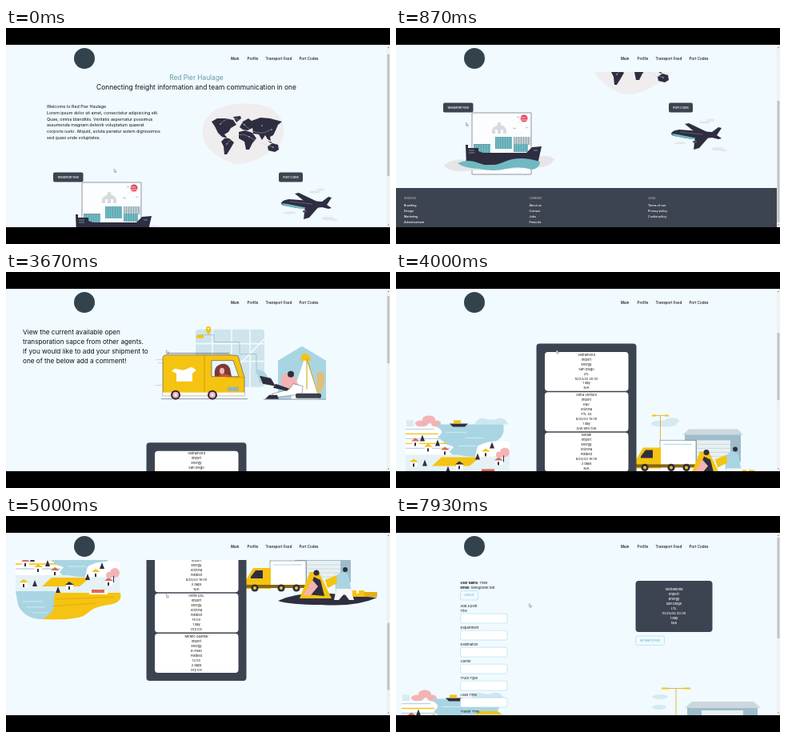
Write an HTML page that moves like this. It is 480 px wide and 270 px high and loops after 8 s.

```html
<!DOCTYPE html>
<html lang="en">
<head>
<meta charset="utf-8">
<style>
  html, body { margin: 0; width: 100%; height: 100%; overflow: hidden; background: #000; }
  svg { display: block; width: 100vw; height: 100vh; font-family: Inter, "Open Sans", sans-serif; }
</style>
</head>
<body>
<svg id="stage" viewBox="0 0 480 270"></svg>
<script>
const LOOP = 8000;
const PAPER = '#f0faff', SLATE = '#3d4451', INK = '#2f2e41', TEAL = '#71b9c2',
      SKY = '#a9d5e3', YELLOW = '#f5c311', PINK = '#f3b3b4', PALE = '#e6e5e8';

// Shape helpers; text is placed by its vertical middle.
const rect = (x, y, w, h, fill, rx = 0, more = '') =>
  `<rect x="${x}" y="${y}" width="${w}" height="${h}" rx="${rx}" fill="${fill}" ${more}/>`;
const path = (d, fill, more = '') => `<path d="${d}" fill="${fill}" ${more}/>`;
const line = (d, stroke, width = 0.6) => path(d, 'none', `stroke="${stroke}" stroke-width="${width}"`);
const oval = (x, y, rx, ry, fill) => `<ellipse cx="${x}" cy="${y}" rx="${rx}" ry="${ry}" fill="${fill}"/>`;
const dot = (x, y, r, fill) => oval(x, y, r, r, fill);
const text = (x, y, s, size, fill = '#111', more = '') =>
  `<text x="${x}" y="${y + size * 0.36}" font-size="${size}" fill="${fill}" ${more}>${s.replace(/&/g, '&amp;')}</text>`;
const lines = (x, y, gap, list, size, fill, more) =>
  list.map((s, i) => text(x, y + i * gap, s, size, fill, more)).join('');
const group = (shapes, dx = 0, dy = 0) => `<g transform="translate(${dx} ${dy})">${shapes}</g>`;
const times = (n, f) => Array.from({ length: n }, (_, i) => f(i)).join('');
const MID = 'text-anchor="middle"', BOLD = 'font-weight="600"', MEDIUM = 'font-weight="500"';

const button = (x, y, w, label, id) =>
  rect(x, y, w, 12, SLATE, 2, `id="${id}"`) + text(x + w / 2, y + 6, label, 3, '#fff', MID + ' ' + BOLD);
const ghost = (x, y, w, label) =>
  rect(x, y, w, 11.5, PAPER, 2, 'stroke="#8ed3e8" stroke-width=".5"') +
  text(x + w / 2, y + 5.8, label, 2.9, '#4fb0cd', MID + ' ' + MEDIUM);

function footer(y) {
  const cols = [
    [10, 'SERVICES', 'Branding', 'Design', 'Marketing', 'Advertisement'],
    [166.5, 'COMPANY', 'About us', 'Contact', 'Jobs', 'Press kit'],
    [315, 'LEGAL', 'Terms of use', 'Privacy policy', 'Cookie policy']];
  return rect(0, y, 476, 60, SLATE) + cols.map(([x, title, ...links]) =>
    text(x, y + 12.5, title, 3.1, '#a3a8b0', BOLD) +
    lines(x, y + 21.5, 7, links, 3.6, '#fff', MEDIUM)).join('');
}

function worldMap() {
  const land = [
    'M257 117L264 113 275 113 284 115 288 121 281 125 278 130 273 133 277 138 270 136 265 131 261 123Z',
    'M284 111L293 110 294 113 288 118Z',
    'M273 138L279 138 285 143 281 150 276 158 273 158 272 148 269 142Z',
    'M292 124L296 117 303 113 308 117 308 125 302 128 296 127Z',
    'M291 130L299 128 308 131 313 138 308 144 304 152 300 152 298 142 291 138Z',
    'M307 116L318 112 330 113 345 117 340 121 337 128 334 134 330 136 331 141 327 139 324 134 320 140 316 133 309 132Z',
    'M327 148L333 144 340 146 341 152 336 155 328 153Z',
    'M327 141L333 143 331 144Z'];
  const pins = [[268, 120], [276, 145], [298, 121], [304, 136], [320, 122], [332, 127], [334, 149]];
  return path('M246 124C250 101 280 92 308 95C334 96 350 111 347 134C344 148 336 153 324 158C310 168 290 174 278 167C262 159 243 149 246 124Z', '#f0edef') +
    land.map(d => path(d, INK)).join('') +
    line('M268 120Q283 104 298 121T332 127M276 145Q290 127 304 136T334 149', '#d5d2d8', 0.4) +
    pins.map(([x, y]) => dot(x, y, 0.7, '#d9eef2')).join('');
}

function ship() {
  const stack = (x, y, n, rows, fill) => rect(x, y, n * 3, rows * 5, fill) +
    times(n, i => line(`M${x + i * 3 + .5} ${y}v${rows * 5}`, '#4d8f99', 0.5));
  return rect(95, 193, 74, 77, '#fbfdff', 0.5, `stroke="${INK}" stroke-width=".5"`) +
    dot(160, 200, 4.5, '#e4485b') + line('M153 199h9M155 202h13M153 205h7', '#f3dfe5', 0.9) +
    line('M146 212l2 .8 2-.8M151 198l1.5.7 1.5-.7M162 211l1.5.8 1.5-.8', '#555', 0.4) +
    path('M120 219V214Q121 211 124 210L127 208V205H131V208L135 210Q138 212 138 215V219H134V214H131V219H127V214H124V219Z', '#d9dadd') +
    stack(97, 232, 7, 1, '#8a969b') + stack(97, 233, 7, 2, TEAL) +
    stack(124, 223, 7, 3, TEAL) + stack(147, 223, 7, 2, '#c6cdd1') + stack(147, 232, 6, 2, TEAL) +
    path('M60 258Q76 248 92 253T130 252T170 250Q188 243 198 251Q195 258 182 261L78 266Q62 264 60 258Z', PALE) +
    path('M87 233H90V237H103V241L109 243H163L170 236 182 235 177 257 88 259Z', INK) +
    line('M91 240h7M91 243h7M172 240h5', '#8fa5ad', 0.8) +
    path('M77 256Q90 250 104 256T136 254T180 254Q180 262 170 264Q154 259 138 263T104 263Q84 262 77 256Z', TEAL);
}

function plane() {
  return oval(386, 205, 7, 1.6, PALE) + oval(393, 202, 5, 1.6, PALE) + oval(355, 231, 8, 1.5, PALE) +
    oval(402, 238, 8, 2, PALE) + oval(410, 240, 4, 1.2, PALE) +
    path('M361 207L366 206 389 217 376 219Z', INK) +
    path('M344 219Q345 215 354 214L380 216 395 217 403 211 407 212 401 221 407 225 403 226 395 224Q378 227 364 225L348 222Q344 221 344 219Z', INK) +
    path('M344 219L352 220 372 224 391 223 384 226Q367 227 348 222Z', TEAL) +
    path('M374 222L393 221 379 237 372 239Z', INK) + rect(371, 228, 5, 2.5, '#51516a', 1) +
    line('M355 217l28 3', '#81909e', 0.5);
}

function mainPage() {
  const intro = ['Welcome to Red Pier Haulage', 'Lorem ipsum dolor sit amet, consectetur adipisicing elit.',
    'Quae, omnis blanditiis. Veritatis aspernatur possimus', 'assumenda magnam deleniti voluptatum quaerat',
    'corporis iusto. Aliquid, soluta pariatur autem dignissimos', 'sed quasi unde voluptates.'];
  return text(238, 62, 'Red Pier Haulage', 8.3, '#639aa5', MID) +
    text(238, 74, 'Connecting freight information and team communication in one', 8.4, '#111', MID) +
    lines(51, 98, 7.8, intro, 5.3) + worldMap() + ship() + plane() +
    button(59, 180.5, 37.5, 'TRANSPORT FEED', 'feedButton') + button(341, 180.5, 30, 'PORT CODES', 'codesButton') +
    footer(287);
}

function van() {
  const wheel = x => dot(x, 154, 6, INK) + dot(x, 154, 3.8, PINK) + dot(x, 154, 1.3, '#fff');
  return rect(237, 72, 86, 72, '#cfe4ec', 4) +
    line('M237 90H323M237 112H323M258 72V144M282 72V144M305 72V144M264 144L323 84', '#f3fafd', 1.6) +
    line('M241 79H260V88H292V103H313V128', '#8fb8c7', 0.7) +
    path('M253 79Q249 74 250 71A3 3 0 0 1 256 71Q257 74 253 79Z', YELLOW) + dot(253, 71, 1.1, '#fff') +
    path('M313 122Q323 122 328 133L317 139Z', SKY) + rect(238, 79, 9, 4, YELLOW, 1) +
    line('M188 110h12M190 114h9M187 142h8', '#e3a9ae', 0.6) +
    path('M196 108Q196 104 201 104H281L290 105 298 132V155H196Z', YELLOW, `stroke="${INK}" stroke-width=".5"`) +
    line('M201 102H279', INK, 0.6) + line('M248 104V154M276 132h22', '#a77d00', 0.5) +
    path('M211 121L207 124 213 127V137H233V127L238 123 232 119 222 123Z', '#fff') +
    path('M257 111H284L291 131H257Z', '#eaf6fa', `stroke="${INK}" stroke-width=".5"`) +
    path('M261 131Q259 119 267 116Q276 113 280 121L282 131Z', '#7b3b35') + oval(270, 124, 3, 4, PINK) +
    path('M264 131Q273 124 282 131Z', '#cb5142') + rect(277, 144, 14, 5, '#94b4bd', 1) +
    rect(196, 151, 102, 4, '#fff') + line('M194 159H302', INK, 0.5) + wheel(212) + wheel(258) +
    path('M370 93L400 111V159H340V111Z', SKY) +
    path('M374 106L356 159H393Z', '#fff') + path('M370 104Q375 98 380 108L383 111H368Z', YELLOW) +
    line('M376 109L392 159M376 109V147', '#d7a619', 1.1) +
    path('M389 132Q386 122 397 126Q400 139 394 150H389Z', '#e2bf76') +
    path('M344 131Q351 124 360 129L367 145 355 150 344 141Z', PINK) + dot(356, 128, 4, INK) +
    path('M359 140L371 143 370 153 337 157 332 153 354 147Z', '#fff', `stroke="${INK}" stroke-width=".4"`) +
    path('M317 130L331 133 337 143 321 140Z', INK) + path('M337 140L354 146 351 149 334 145Z', INK) +
    path('M329 154L339 154 341 159H324Z', INK) + rect(362, 152, 32, 6, '#39414d', 2) +
    line('M322 159.5H400', INK, 0.5);
}

function village() {
  const house = (x, y, roof) => rect(x, y, 9, 6, '#fff') + path(`M${x - 1} ${y}l5-4 6 4Z`, roof) + rect(x + 3, y + 2, 2, 4, INK);
  const tree = (x, y) => path(`M${x} ${y}l3-8 3 8Z`, INK);
  return oval(32, 135, 8, 4, PINK) + oval(41, 130, 8, 5, PINK) + oval(50, 135, 6, 4, PINK) +
    rect(13, 131, 9, 8, '#dce9ee') + path('M98 136Q103 126 112 129T128 128Q138 128 140 136Z', '#cde7f0') +
    path('M52 136H134Q138 154 118 160T104 184Q89 190 75 178T60 158Q46 150 52 136Z', SKY) +
    line('M62 146h26M86 153h24M78 163h22', '#e0f1f6', 0.8) +
    path('M67 135H90L86 139H71Z', INK) + rect(72, 131, 9, 4, YELLOW) +
    path('M12 139H50Q62 144 54 150T72 164L64 174H12Z', '#fff') +
    times(5, i => line(`M12 ${142 + i * 6}h${36 + i * 5}`, i % 2 ? YELLOW : '#b9d8e2', 1.4)) +
    path('M102 163Q119 154 142 158V188H96Z', '#fff') +
    path('M12 174H78Q98 179 142 174V196H12Z', '#e5f1f5') + path('M57 177H105L92 188H45Z', YELLOW) +
    house(20, 157, '#d66b59') + house(36, 164, YELLOW) + house(57, 168, '#d66b59') +
    house(108, 170, YELLOW) + house(124, 181, '#d66b59') + house(75, 186, INK) + house(18, 183, YELLOW) +
    tree(30, 157) + tree(49, 163) + tree(99, 180) + tree(117, 166) + tree(33, 188) + tree(62, 196) +
    dot(136, 171, 6, PINK) + dot(129, 174, 4, PINK) + rect(134, 175, 1, 8, INK) +
    path('M12 194H60L72 206 63 229H42Q22 227 15 211Z', SKY) +
    path('M62 196H143Q146 209 128 211T101 222T45 229Q61 221 60 211T62 196Z', YELLOW) +
    line('M62 204Q97 203 135 201M57 213Q82 211 113 209', '#d59d0a', 0.6) +
    rect(104, 193, 23, 5, '#fff') + rect(107, 192, 16, 4, '#d66b59') + line('M20 207h27M25 214h24M33 221h19', '#e0f1f6', 0.7);
}

const lamps = (x, y, w, h) =>
  line(`M${x} ${y}H${x + w}M${x + w / 2} ${y}v${h}`, '#d9a91a', 0.8) +
  rect(x, y - 1, w / 4, 2, YELLOW, 0.5) + rect(x + w * 0.75, y - 1, w / 4, 2, YELLOW, 0.5);

function depot() {
  const wheel = x => dot(x, 190, 4.6, INK) + dot(x, 190, 2, YELLOW);
  return oval(335, 135, 16, 4, '#d4e9f1') + oval(345, 132, 9, 4, '#d4e9f1') + lamps(320, 125, 21, 33) +
    path('M358 149L366 142H427L434 149Z', '#ccd8dd') + rect(361, 149, 70, 34, '#9ebdca') +
    rect(376, 156, 42, 27, '#e8f0f2') + times(4, i => line(`M376 ${161 + i * 5}h42`, '#aec2cb', 0.5)) +
    path('M340 206Q365 194 406 197L464 202Q437 214 394 211Q355 211 340 206Z', INK) +
    rect(330, 156, 45, 33, '#fff', 1, `stroke="${INK}" stroke-width=".4"`) + line('M334 161h36', SKY, 1) +
    path('M300 180L309 165H331V191H300Z', YELLOW) + path('M306 176L312 168H321V178H306Z', INK) +
    rect(300, 186, 75, 4, '#8a6610') + wheel(311) + wheel(344) + wheel(363) +
    path('M367 203L380 170 391 170 407 203Z', YELLOW) + path('M376 198L385 176 393 180 398 200Z', INK) +
    dot(388, 171, 3.5, INK) + path('M383 180L390 188 381 199 372 199Z', PINK) +
    path('M411 177Q420 165 428 174L432 195H412Z', SKY) + dot(424, 167, 3, INK) +
    path('M413 191H431L435 205H429L423 197 416 205H410Z', '#f7f7f7') + path('M399 180L413 174 414 184 402 190Z', YELLOW) +
    rect(433, 193, 15, 8, YELLOW) + rect(448, 195, 16, 6, '#e6ad12') + rect(438, 193, 3, 4, '#fff');
}

const shipments = [
  ['Veltramond', 'Import', 'Energy', 'San Diego', 'LTL', '10/23/22 20:00', '1 day', 'N/A'],
  ['Ostra Venture', 'Import', 'K&V', 'Arizona', 'FTL 53', '8/23/22 15:00', '1 day', 'S/W and T/W'],
  ['Norabi', 'Import', 'Energy', 'Arizona', 'Flatbed', '8/23/22 18:00', '2 days', 'N/A'],
  ['Ostra QDL', 'Import', 'Energy', 'Arizona', 'Flatbed', '16:00', '1 day', 'Dry Ice'],
  ['Mirano Quantal', 'Import', 'Energy', 'El Paso', 'Flatbed', '12:00', '2 days', 'Dry Ice']];

function feedPage() {
  const pitch = ['View the current available open', 'transporation sapce from other agents.',
    'If you would like to add your shipment to', 'one of the below add a comment!'];
  return lines(21, 75, 12, pitch, 8.2) + van() +
    group(village() + depot(), 0, 178.5) + rect(175.5, 213.5, 125, 271, SLATE, 4) +
    shipments.map((rows, i) => rect(186, 224 + i * 50.4, 104.5, 48.9, '#fff', 4) +
      lines(238, 227.3 + i * 50.4, 5.98, rows, 4, '#111', MID)).join('') +
    footer(544.5);
}

function profilePage() {
  const fields = ['Title', 'Department', 'Destination', 'Carrier', 'Truck Type', 'Load Time', 'Transit Time'];
  const bold = s => `<tspan font-weight="700">${s}</tspan>`;
  return group(village(), -5, 92.5) + path('M98 249Q101 244 110 244H127L134 249Z', YELLOW) +
    lamps(332, 215.5, 36, 34) + oval(330, 226, 10, 3, '#d4e9f1') + oval(329, 239, 9, 3, '#d4e9f1') +
    path('M361 240L370 232H447L456 240Z', '#ccd8dd') + rect(364, 240, 88, 12, '#9ebdca') + rect(382, 243, 52, 10, '#e8f0f2') +
    text(80.5, 84, bold('User Name:') + ' Tovik', 4) + text(80.5, 90, bold('Email:') + ' tovik@tovik.test', 4) +
    ghost(80.5, 93.5, 22, 'LOGOUT') + text(80.5, 113, 'Add a post', 4.1) +
    fields.map((s, i) => text(80.5, 119 + i * 21, s, 4.1) +
      rect(80.5, 122.2 + i * 21, 58.5, 11.8, '#fff', 2, 'stroke="#9bd6e9" stroke-width=".5"')).join('') +
    rect(299.5, 81, 96, 64, SLATE, 4) + lines(347.5, 92, 6, shipments[0], 4, '#fff', MID + ' ' + MEDIUM) +
    ghost(299.5, 150, 36, 'RETURN TO FEED');
}

const nav = [[281, 'Main'], [301.5, 'Profile'], [324.5, 'Transport Feed'], [366.5, 'Port Codes']];
const stage = document.getElementById('stage');
stage.innerHTML = rect(0, 0, 480, 270, PAPER) +
  [mainPage, feedPage, profilePage].map((page, i) => `<g id="page${i}">${page()}</g>`).join('') +
  rect(0, 21, 476, 34, PAPER) + dot(98, 38, 13, '#33434e') +
  nav.map(([x, s]) => text(x, 38, s, 4.5, '#111', MEDIUM)).join('') +
  rect(476, 21, 4, 228, '#f1f1f1') + rect(476.6, 27, 2.8, 84, '#c1c1c1', 0, 'id="thumb"') +
  path('M478 23.5l1.2 1.6h-2.4ZM478 247l1.2-1.6h-2.4Z', '#888') +
  path('M0 0V4.2L1 3.3 1.8 5 2.5 4.7 1.8 3.1H3.1Z', '#fff', 'id="cursor" stroke="#555" stroke-width=".4"') +
  rect(0, 0, 480, 21, '#000') + rect(0, 249, 480, 21, '#000');

// Keys are [time, ...values].
const cursorKeys = [[0, 135, 176], [70, 135, 176], [870, 87.5, 118], [930, 87.5, 118], [1700, 78, 100], [1900, 78, 100],
  [2470, 178.5, 94.5], [2670, 187, 97], [2870, 187, 97], [2930, 197, 97], [3070, 197, 97], [3130, 200.5, 97.5],
  [5200, 200.5, 97.5], [5930, 320, 39.5], [6000, 320, 39.5], [6500, 308, 39], [6900, 308, 39], [7900, 166.5, 109.5]];
const pages = [
  { from: 0, scroll: [[70, 0], [300, 40], [800, 87]], thumb: [33, 0.667, 152] },
  { from: 2600, scroll: [[3600, -8], [3670, 0], [4070, 150], [4270, 150], [4400, 178.5], [5070, 290], [5130, 290], [5700, 308.5]], thumb: [30, 0.372, 84] },
  { from: 6900, scroll: [[0, 0]], thumb: [27, 0, 126] }];

function at(keys, t, ease = k => k) {
  const i = keys.findIndex(key => key[0] > t);
  if (i < 0) return keys[keys.length - 1].slice(1);
  if (i === 0) return keys[0].slice(1);
  const [a, b] = [keys[i - 1], keys[i]];
  const k = ease((t - a[0]) / (b[0] - a[0]));
  return a.slice(1).map((v, j) => v + (b[j + 1] - v) * k);
}
const smooth = k => k * k * (3 - 2 * k);
const $ = id => document.getElementById(id);

function draw(now) {
  const t = now % LOOP;
  const current = pages.findLastIndex(p => t >= p.from);
  const { scroll, thumb: [top, rate, size] } = pages[current];
  const [y] = at(scroll, t);
  pages.forEach((_, i) => $('page' + i).setAttribute('display', i === current ? 'inline' : 'none'));
  $('page' + current).setAttribute('transform', `translate(0 ${-y})`);
  $('thumb').setAttribute('y', top + y * rate);
  $('thumb').setAttribute('height', size);
  const [cx, cy] = at(cursorKeys, t, smooth);
  $('cursor').setAttribute('transform', `translate(${cx} ${cy})`);
  const over = cx > 59 && cx < 96.5 && cy + y > 180.5 && cy + y < 192.5;
  $('feedButton').setAttribute('fill', over ? '#2a2e37' : SLATE);
}

const start = performance.now();
function tick() {
  draw(performance.now() - start);
  requestAnimationFrame(tick);
}
tick();
</script>
</body>
</html>
```
